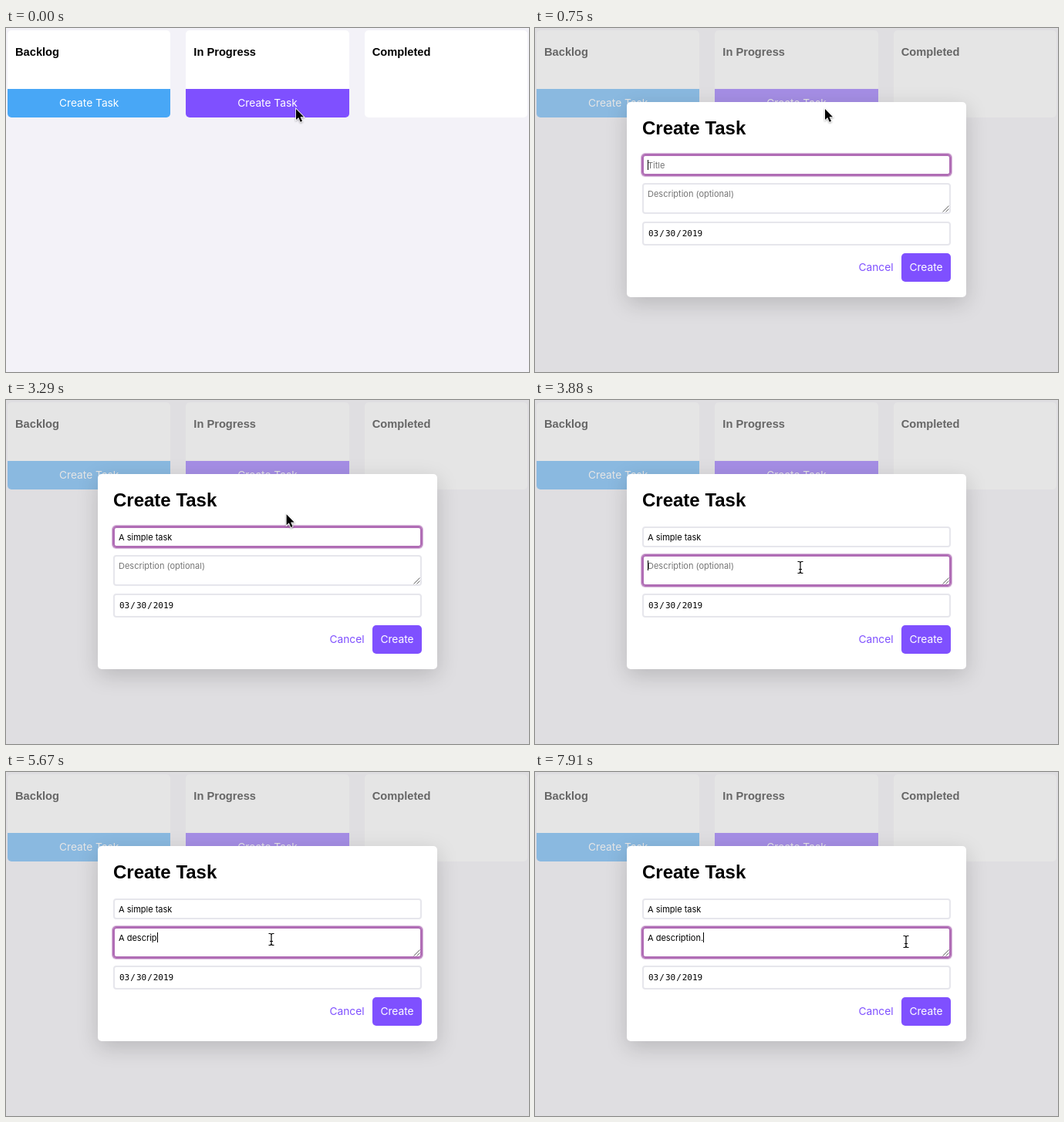
Write an HTML page that moves like this. It is 678 by 446 pixels and loops after 8 s.

```html
<!DOCTYPE html>
<html lang="en">
<head>
<meta charset="utf-8">
<title>Task board</title>
<style>
html, body { margin: 0; width: 100%; height: 100%; overflow: hidden; background: #f3f2f8; }
body { position: relative; }
body * { box-sizing: border-box; }
.col, .col *, #overlay, #dialog, #dialog > *, #pointer { position: absolute; }
.col { top: 3px; width: 211.33px; height: 113px; background: #fff; border-radius: 5px; }
h3, h2 { margin: 0; font-family: "Liberation Sans", Arial, sans-serif; white-space: nowrap; }
h3 { left: 10px; top: 18px; font-size: 14.67px; line-height: 20px; }
h2 { left: 20px; top: 19px; font-size: 24px; line-height: 30px; }
.btn { height: 37px; font: 13.75px/37px Inter, sans-serif; text-align: center; color: #fff; background: #7f50ff; border-radius: 5px; }
.col .btn { left: 0; top: 76px; width: 100%; border-radius: 0 0 5px 5px; }
.col .blue { background: #48a7f6; }
.btn.focus { box-shadow: inset 0 0 0 1px #c9a0dc, 0 0 0 2px #a96cae, 0 0 1px 3px #a96cae80; }
#overlay { inset: 0; background: #cccccc80; }
#dialog { left: 119px; top: 96px; width: 440px; height: 253px; background: #fff; border-radius: 5px; box-shadow: 0 8px 28px #0000002c; }
.field { left: 20px; width: 400px; padding: 5px; border: 2px solid #e6e6ec; border-radius: 4px; font: 11px/14px Inter, sans-serif; white-space: pre; }
.field.focus { border-color: #b06db5; box-shadow: 0 0 0 1px #b06db5, 0 0 1px 2px #b06db580; }
.hint { color: #757575; }
.caret { position: absolute; width: 1px; height: 13px; background: #000; }
.date { font: 11px/13px "DejaVu Sans Mono", monospace; }
.date span { padding: 0 1px; }
#dialog .cancel { left: 300px; top: 196px; width: 46px; background: none; color: #7f50ff; }
#dialog .create { left: 356px; top: 196px; width: 64px; }
#grip { left: 409px; top: 134px; }
#pointer { left: 0; top: 0; overflow: visible; }
</style>
</head>
<body>
<div class="col" style="left:2px"><h3>Backlog</h3><div class="btn blue">Create Task</div></div>
<div class="col" style="left:233.33px"><h3>In Progress</h3><div class="btn" id="open">Create Task</div></div>
<div class="col" style="left:464.67px"><h3>Completed</h3></div>
<div id="overlay">
  <div id="dialog">
    <h2>Create Task</h2>
    <div class="field" id="title" style="top:68px;height:27px"></div>
    <div class="field" id="desc" style="top:105px;height:40px"></div>
    <svg id="grip" width="9" height="9" fill="none" stroke="#666"><path d="M.5 8.5l8-8M4.5 8.5l4-4"/></svg>
    <div class="field date" style="top:155px;height:31px;padding-top:7px"><span>03</span>/<span>30</span>/<span>2019</span></div>
    <div class="btn cancel">Cancel</div>
    <div class="btn create">Create</div>
  </div>
</div>
<svg id="pointer" width="1" height="1">
  <g id="arrow" style="filter:drop-shadow(0 1px 1px #0005)">
    <path d="M0 0V14L3.2 11L5.7 16.8L8 15.8L5.5 10.2H10Z" stroke="#fff" stroke-width="1.6" paint-order="stroke"/>
  </g>
  <g id="beam" fill="none">
    <path id="stem" d="M-3.5-7.5h1.5q2 0 2 2v11q0 2-2 2h-1.5M3.5-7.5h-1.5q-2 0-2 2M3.5 7.5h-1.5q-2 0-2-2M-2 2.5h4" stroke="#fff" stroke-width="2.4" stroke-opacity=".7"/>
    <use href="#stem"/>
    <path d="M-3.5-7.5h1.5q2 0 2 2v11q0 2-2 2h-1.5M3.5-7.5h-1.5q-2 0-2 2M3.5 7.5h-1.5q-2 0-2-2M-2 2.5h4" stroke="#000" stroke-width="1.2"/>
  </g>
</svg>
<script>
const LOOP = 8000, STEP = 150;
const $ = id => document.getElementById(id);

// [time, characters typed]
const titleKeys = [1, 3, 4, 5, 6, 8, 10, 11, 13].map((n, i) => [1650 + i * STEP, n]);
const descKeys = [[4180, 1], [4480, 2], [4630, 3], [4770, 4], [4920, 5], [5070, 6],
  [5370, 8], [5670, 9], [5820, 11], [5960, 13], [7910, 14]];
const caretOff = [[1200, 1650], [3290, 3880], [6410, 7010], [7460, 7910]];

const typed = (text, keys, t) => text.slice(0, keys.reduce((n, k) => t >= k[0] ? k[1] : n, 0));
const stepped = (t, start, count) =>
  Math.min(1, Math.max(0, (Math.floor((t - start) / STEP) + 1) / count));
const bezier = (a, b, c, u) => (1 - u) ** 2 * a + 2 * u * (1 - u) * b + u * u * c;

function pointerAt(t) {
  if (t < 7010) {
    const u = 1 - (1 - stepped(t, 3290, 4)) ** 1.7;
    return [376 - 32 * u, 105 + 112 * u];
  }
  const s = stepped(t, 7010, 5), u = s * s * (3 - 2 * s);
  return [bezier(344, 420, 481, u), bezier(217, 194, 220, u)];
}

function setField(id, text, hint, focus, caret) {
  const html = (text || (caret ? "" : `<span class="hint">${hint}</span>`)) +
    (caret ? '<i class="caret"></i>' : "") +
    (!text && caret ? `<span class="hint">${hint}</span>` : "");
  const el = $(id);
  if (el.dataset.html !== html) el.innerHTML = el.dataset.html = html;
  el.classList.toggle("focus", focus);
}

function draw(now) {
  const t = now % LOOP;
  const caret = !caretOff.some(([a, b]) => t >= a && t < b);
  const inDesc = t >= 3880;
  $("open").classList.toggle("focus", t >= 600 && t < 750);
  $("overlay").style.display = t < 750 ? "none" : "block";
  setField("title", typed("A simple task", titleKeys, t), "Title", !inDesc, !inDesc && caret);
  setField("desc", typed("A description.", descKeys, t), "Description (optional)", inDesc, inDesc && caret);

  const [x, y] = pointerAt(t), overText = y > 163;
  $("pointer").style.transform = `translate(${x}px, ${y}px)`;
  $("arrow").style.display = overText ? "none" : "";
  $("beam").style.display = overText ? "" : "none";
  requestAnimationFrame(draw);
}
requestAnimationFrame(draw);
</script>
</body>
</html>
```
